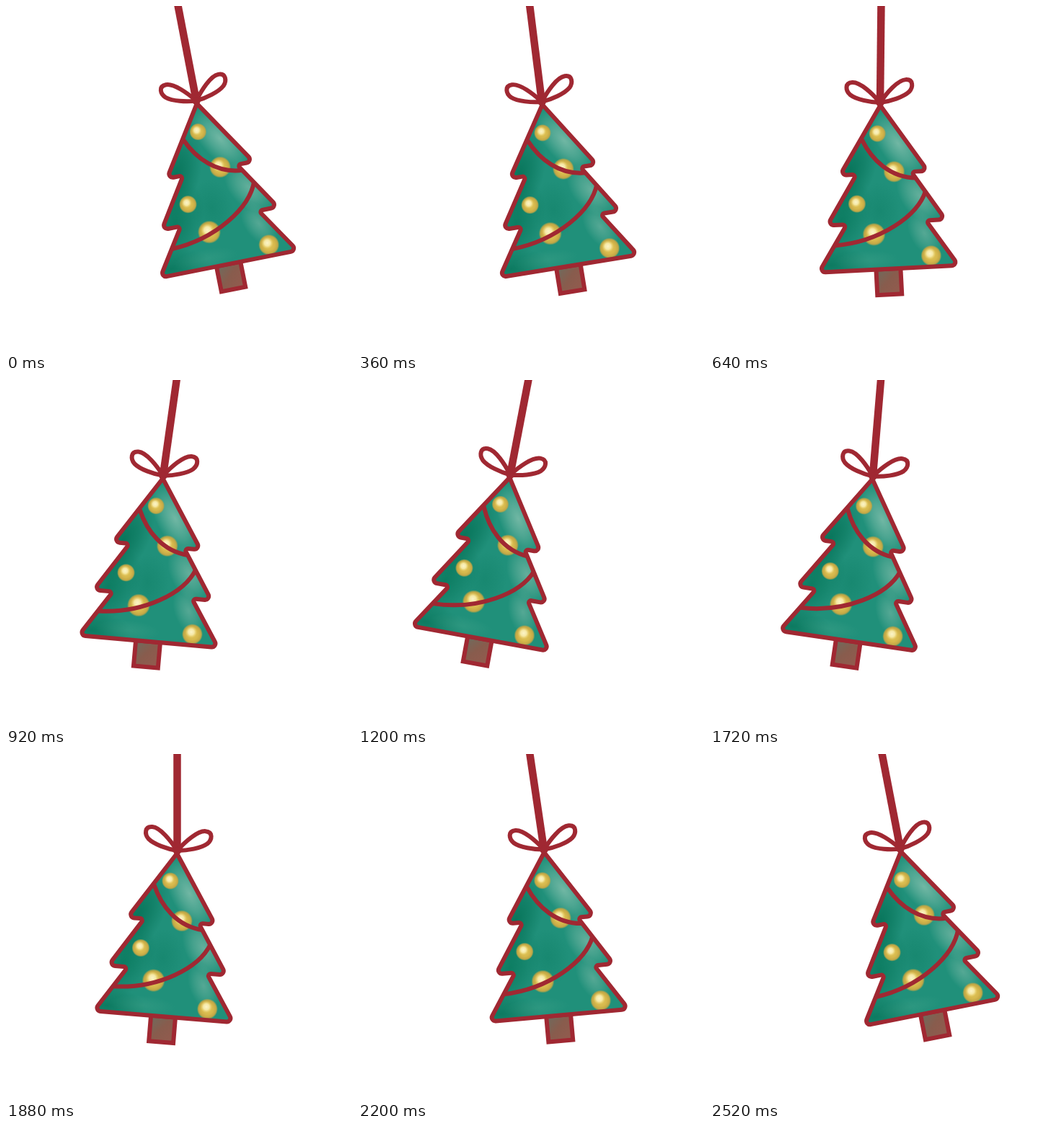
Animation, 480 px wide and 480 px high, one loop 2.56 s. Source, as an HTML page with a canvas:

```html
<!DOCTYPE html>
<html lang="en">
<head>
<meta charset="utf-8">
<title>Swinging tree</title>
<style>
  html, body { margin: 0; width: 100%; height: 100%; overflow: hidden; background: #fff; }
  canvas { display: block; }
</style>
</head>
<body>
<canvas id="stage" width="480" height="480"></canvas>
<script>
const ctx = document.getElementById('stage').getContext('2d');
const RED = '#a02832';
const LOOP = 2560, STEP = 40, PERIOD = LOOP - STEP;
const PIVOT = { x: 237.5, y: -6 }, ROPE = 140;
const { sin, cos, PI } = Math;
const rad = deg => deg * PI / 180;

// Angles in degrees, positive to the right; the tree trails behind the rope.
const ropeSwing = u => 11.3 * cos(u) - 0.4 * cos(3 * u) - 0.3 * sin(u);
const treeSwing = u =>
  11.1 * cos(u) + 3.58 * sin(u) + 0.38 * cos(2 * u) - 0.25 * sin(3 * u) - 0.22;

// Right half of the outline: x, y, corner radius; mirrored for the left half.
const HALF = [
  [61, 98, 5], [38, 98, 3],
  [82, 166.5, 5], [55, 166.5, 3],
  [97, 231, 5]
];

function treeOutline() {
  const left = HALF.map(([x, y, r]) => [-x, y, r]).reverse();
  const points = [...HALF, ...left, [0, 4, 0]];
  const path = new Path2D();
  path.moveTo(0, 4);
  for (let i = 0; i < points.length - 1; i++) {
    const [x, y, r] = points[i], [nextX, nextY] = points[i + 1];
    path.arcTo(x, y, nextX, nextY, r);
  }
  path.closePath();
  return path;
}

const TREE = treeOutline();
const GARLANDS = [
  new Path2D('M-28 50C-16 78 8 105 45 107'),
  new Path2D('M57 125C44 160-10 193-73 195')
];
const LOOP_PATH = new Path2D('M0 0C-10-13-26-30-37-30C-48-30-47-19-41-13C-33-6-14-1 0 0');

// Soft shading patches: x, y, horizontal radius, vertical radius, tilt, rgb, alpha.
const SHADES = [
  [-48, 95, 34, 66, 25, '0,108,80', 0.75],
  [-62, 160, 38, 60, 30, '0,112,82', 0.6],
  [-80, 222, 55, 26, 0, '0,108,80', 0.6],
  [-8, 150, 30, 40, 0, '12,124,98', 0.4],
  [22, 58, 26, 52, -32, '140,196,178', 0.75],
  [48, 132, 26, 42, -32, '136,192,174', 0.65],
  [52, 184, 20, 34, -25, '128,188,170', 0.55],
  [-30, 218, 45, 14, 0, '70,165,140', 0.35]
];

const LIGHTS = [
  [-6, 42.7, 12], [14.5, 96.7, 15], [-39.3, 138.7, 12.5], [-17.9, 182.2, 16], [59.8, 215.6, 14.5]
];

function glow(x, y, rx, ry, tilt, stops) {
  ctx.save();
  ctx.translate(x, y);
  ctx.rotate(rad(tilt));
  ctx.scale(rx, ry);
  const fill = ctx.createRadialGradient(0, 0, 0, 0, 0, 1);
  stops.forEach(([at, color]) => fill.addColorStop(at, color));
  ctx.fillStyle = fill;
  ctx.fillRect(-1, -1, 2, 2);
  ctx.restore();
}

function drawLight([x, y, r]) {
  glow(x, y, r, r, 0, [
    [0, '#e2c65c'], [0.55, '#d6b84c'], [0.82, '#c4a846'],
    [0.9, 'rgba(180,165,72,.75)'], [1, 'rgba(150,155,80,0)']
  ]);
  glow(x - r * 0.12, y - r * 0.2, r * 0.58, r * 0.58, 0, [
    [0, '#fbf4c8'], [0.5, '#f5e8a4'], [1, 'rgba(236,212,110,0)']
  ]);
}

function drawTrunk() {
  const wood = ctx.createLinearGradient(-14, 236, 14, 262);
  wood.addColorStop(0, '#74685a');
  wood.addColorStop(0.45, '#885c4d');
  wood.addColorStop(1, '#925b4e');
  ctx.fillStyle = wood;
  ctx.lineJoin = 'miter';
  ctx.beginPath();
  ctx.rect(-17.5, 231, 34, 35.5);
  ctx.fill();
  ctx.stroke();
}

function drawBow() {
  ctx.stroke(LOOP_PATH);
  ctx.save();
  ctx.scale(-1, 1);
  ctx.stroke(LOOP_PATH);
  ctx.restore();
  ctx.fillStyle = RED;
  ctx.beginPath();
  ctx.arc(0, 0.5, 5.5, 0, 2 * PI);
  ctx.fill();
}

function drawTree() {
  ctx.strokeStyle = RED;
  ctx.lineWidth = 6;
  drawTrunk();
  ctx.lineJoin = 'round';

  ctx.save();
  ctx.clip(TREE);
  ctx.fillStyle = '#20907a';
  ctx.fillRect(-100, 0, 200, 240);
  for (const [x, y, rx, ry, tilt, rgb, alpha] of SHADES) {
    glow(x, y, rx, ry, tilt, [
      [0, `rgba(${rgb},${alpha})`], [0.5, `rgba(${rgb},${alpha * 0.55})`], [1, `rgba(${rgb},0)`]
    ]);
  }
  LIGHTS.forEach(drawLight);
  GARLANDS.forEach(path => ctx.stroke(path));
  ctx.restore();

  ctx.stroke(TREE);
  drawBow();
}

function draw(time) {
  const t = Math.floor(time % LOOP / STEP) * STEP;
  const phase = 2 * PI * t / PERIOD;
  const ropeAngle = rad(ropeSwing(phase));
  const knotX = PIVOT.x + ROPE * sin(ropeAngle);
  const knotY = PIVOT.y + ROPE * cos(ropeAngle);

  ctx.fillStyle = '#fff';
  ctx.fillRect(0, 0, 480, 480);

  ctx.strokeStyle = RED;
  ctx.lineWidth = 10.5;
  ctx.beginPath();
  ctx.moveTo(2 * PIVOT.x - knotX, 2 * PIVOT.y - knotY);
  ctx.lineTo(knotX, knotY);
  ctx.stroke();

  ctx.save();
  ctx.translate(knotX, knotY);
  ctx.rotate(-rad(treeSwing(phase)));
  drawTree();
  ctx.restore();
}

const start = performance.now();
function tick() {
  draw(performance.now() - start);
  requestAnimationFrame(tick);
}
tick();
</script>
</body>
</html>
```
